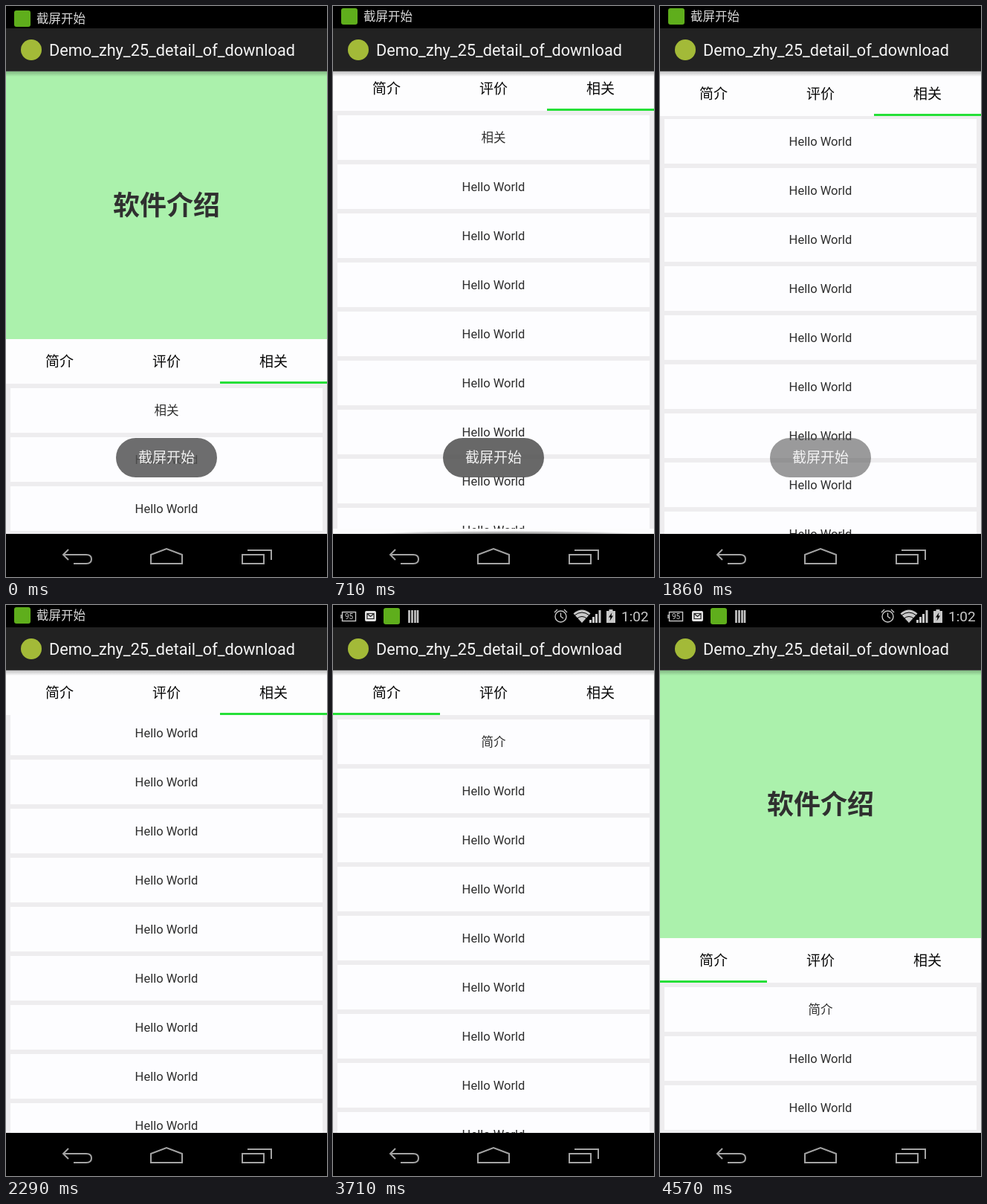
An HTML page that plays this animation: 432x768 px, repeating every 4.71 s.

```html
<!DOCTYPE html>
<html lang="zh">
<head>
<meta charset="utf-8">
<title>Sticky tabs</title>
<style>
html, body { margin: 0; width: 100%; height: 100%; overflow: hidden; background: #000; }
#stage { position: relative; width: 432px; height: 768px; overflow: hidden; background: #000;
  font: 16.5px Roboto, "Noto Sans CJK SC", "Noto Sans CJK", sans-serif; text-align: center; }
#stage div, #stage svg { position: absolute; }
#status { left: 0; top: 0; width: 432px; height: 30px; overflow: hidden; color: #d8d8d8; }
#ticker, #icons { left: 0; top: 0; width: 432px; height: 30px; }
#ticker .label { left: 41px; top: 0; line-height: 30px; white-space: nowrap; }
.app { width: 22px; height: 22px; border-radius: 3px; background: #5fae1c; }
#bar { left: 0; top: 30px; width: 432px; height: 58px; background: #222; color: #f4f4f4;
  box-shadow: inset 0 -1px #444; }
#bar .title { left: 58px; line-height: 60px; font-size: 21.7px; white-space: nowrap; }
#bar .logo { left: 20px; top: 15px; width: 28px; height: 28px; border-radius: 50%; background: #a3ba38; }
#view { left: 0; top: 88px; width: 432px; height: 622px; overflow: hidden; background: #fcfcfd; }
#shade { left: 0; top: 0; width: 432px; height: 7px;
  background: linear-gradient(rgba(0, 0, 0, .24), rgba(0, 0, 0, 0)); }
#glow { left: 55px; top: 618px; width: 360px; height: 4px;
  background: radial-gradient(ellipse 50% 100% at 50% 100%, #888, rgba(150, 150, 150, .5) 70%, transparent); }
#content { left: 0; top: 0; width: 432px; height: 982px; }
#hero { left: 0; top: 0; width: 432px; height: 360px; background: #abf1ac; color: #303030;
  font-size: 36px; font-weight: bold; line-height: 363px; }
#tabs { left: 0; top: 360px; width: 432px; height: 60px; background: #fdfdfe; color: #080808; }
#tabs .tab { top: 0; width: 144px; font-size: 19px; line-height: 62px; }
#mark { left: 0; top: 57px; width: 144px; height: 3px; background: #26e038; }
#pager { left: 0; top: 420px; width: 432px; height: 562px; overflow: hidden; background: #eeedef; }
.page { left: 0; top: 0; width: 432px; height: 562px; overflow: hidden; background: #eeedef; }
.list { left: 0; top: 0; width: 432px; }
.row { left: 6px; width: 420px; height: 60px; line-height: 62px; background: #fdfdff; color: #2e2e2e; }
#toast { left: 148px; top: 581px; width: 136px; height: 53px; border-radius: 26.5px; line-height: 53px;
  font-size: 19px; background: rgba(82, 82, 82, .87); color: #f2f2f2; }
#nav { left: 0; top: 710px; background: #000; }
</style>
</head>
<body>
<div id="stage">
  <div id="view">
    <div id="content">
      <div id="hero">软件介绍</div>
      <div id="pager"></div>
      <div id="tabs"><div id="mark"></div></div>
    </div>
    <div id="glow"></div>
    <div id="shade"></div>
  </div>
  <div id="bar"><div class="logo"></div><div class="title">Demo_zhy_25_detail_of_download</div></div>
  <div id="status">
    <div id="ticker"><div class="app" style="left:11px;top:3px"></div><div class="label">截屏开始</div></div>
    <svg id="icons" width="432" height="30" fill="none" stroke="#c8c8c8" stroke-width="1.4">
      <rect x="12.500" y="9.500" width="18" height="12"/>
      <path d="M11 13v5"/>
      <text x="21.500" y="19" font-size="10" text-anchor="middle" fill="#c8c8c8" stroke="none">95</text>
      <rect x="43" y="8" width="15" height="14" rx="2" fill="#e0e0e0" stroke="none"/>
      <path d="M46 11.500h9v7h-9zl4.500 4 4.500-4" stroke="#222" stroke-width="1.200"/>
      <rect x="68" y="4" width="22" height="22" rx="3" fill="#5fae1c" stroke="none"/>
      <path d="M102.500 7v17M106.500 7v17M110.500 7v17M114 7v17" stroke-width="2.600"/>
      <circle cx="306.500" cy="15.500" r="7.500"/>
      <path d="M306.500 10.500v5l3.500 2.500M298 10l4-4M315 10l-4-4"/>
      <path d="M323.500 11.500q11.500-10 23 0L335 24z" fill="#c8c8c8" stroke="none"/>
      <path d="M325 14q10-8 20 0M328.500 18q6.500-5 13 0" stroke="#000" stroke-width="1"/>
      <path d="M346.500 24v-4M350.500 24v-8M354.500 24v-12M359 24V7" stroke-width="3"/>
      <path d="M368 8h3.500V6h5v2h3.500v16h-12z" fill="#c8c8c8" stroke="none"/>
      <path d="M375.500 10l-4.500 6.500h2.500l-1 5 4.500-7h-2.500z" fill="#000" stroke="none"/>
      <text x="388" y="22" font-size="19" fill="#c8c8c8" stroke="none">1:02</text>
    </svg>
  </div>
  <div id="toast">截屏开始</div>
  <svg id="nav" width="432" height="58" viewBox="0 710 432 58" fill="none" stroke="#a4a4a4" stroke-width="2">
    <path d="M84 731l-7 7 7 7M77 738h31q7 0 7 6t-7 6H91"/>
    <path d="M195 750v-12l21-8 21 8v12z"/>
    <path d="M318 738h29v12h-29zM325 732h32v13"/>
  </svg>
</div>
<script>
const LOOP = 4710, STEPS = 33, WIDTH = 432, PITCH = 66;
const $ = id => document.getElementById(id);

// Each track is a list of [step, value]; values between are linear.
const tracks = {
  scroll: [[0, 0], [1, 20], [3, 180], [4, 320], [5, 367], [6, 360], [27, 360], [28, 325], [30, 110], [31, 25], [32, 0]],
  list: [[6, 0], [7, 25], [8, 80], [10, 226], [12, 450], [14, 610], [16, 672], [17, 685], [18, 689]],
  page: [[18, 2], [19, 1.78], [20, 1.4], [21, 1.1], [22, 1.023], [23, 1], [24, .7], [25, .2], [26, 0]],
  toast: [[0, .96], [1, 1], [12, 1], [15, 0]],
  glow: [[4, 0], [5, 1], [6, .4], [7, 0]],
  tickerY: [[0, 3], [1, 0], [20, 0], [22, 14], [23, 28]],
  tickerAlpha: [[20, 1], [22, .12], [23, 0]],
  iconsY: [[20, -28], [21, -18], [22, -7], [23, 0]],
  iconsAlpha: [[20, 0], [22, .72], [23, 1]]
};

function at(track, step) {
  const next = track.findIndex(k => k[0] >= step);
  if (next < 0) return track[track.length - 1][1];
  if (next === 0) return track[0][1];
  const [s0, v0] = track[next - 1], [s1, v1] = track[next];
  return v0 + (v1 - v0) * (step - s0) / (s1 - s0);
}

function add(parent, cls, text = '') {
  const el = document.createElement('div');
  el.className = cls;
  el.textContent = text;
  return parent.appendChild(el);
}

const pages = ['简介', '评价', '相关'].map((name, i) => {
  add($('tabs'), 'tab', name).style.left = i * 144 + 'px';
  const page = add($('pager'), 'page'), list = add(page, 'list');
  for (let r = 0; r < 21; r++) {
    add(list, 'row', r ? 'Hello World' : name).style.top = 6 + r * PITCH + 'px';
  }
  return { page, list };
});

const move = (el, x, y) => { el.style.transform = `translate(${x}px, ${y}px)`; };

function draw(step) {
  const v = {};
  for (const key in tracks) v[key] = at(tracks[key], step);
  move($('content'), 0, -Math.round(v.scroll));
  pages.forEach(({ page }, i) => move(page, Math.round(WIDTH * (i - v.page)), 0));
  move(pages[2].list, 0, -Math.round(v.list));
  move($('mark'), Math.round(144 * v.page), 0);
  move($('ticker'), 0, v.tickerY);
  move($('icons'), 0, v.iconsY);
  $('ticker').style.opacity = v.tickerAlpha;
  $('icons').style.opacity = v.iconsAlpha;
  $('toast').style.opacity = v.toast;
  $('glow').style.opacity = v.glow;
}

const start = performance.now();
function tick() {
  const t = (performance.now() - start) % LOOP;
  draw(Math.min(STEPS - 1, Math.floor((t + 5) * STEPS / LOOP)));
  requestAnimationFrame(tick);
}
tick();
</script>
</body>
</html>
```
